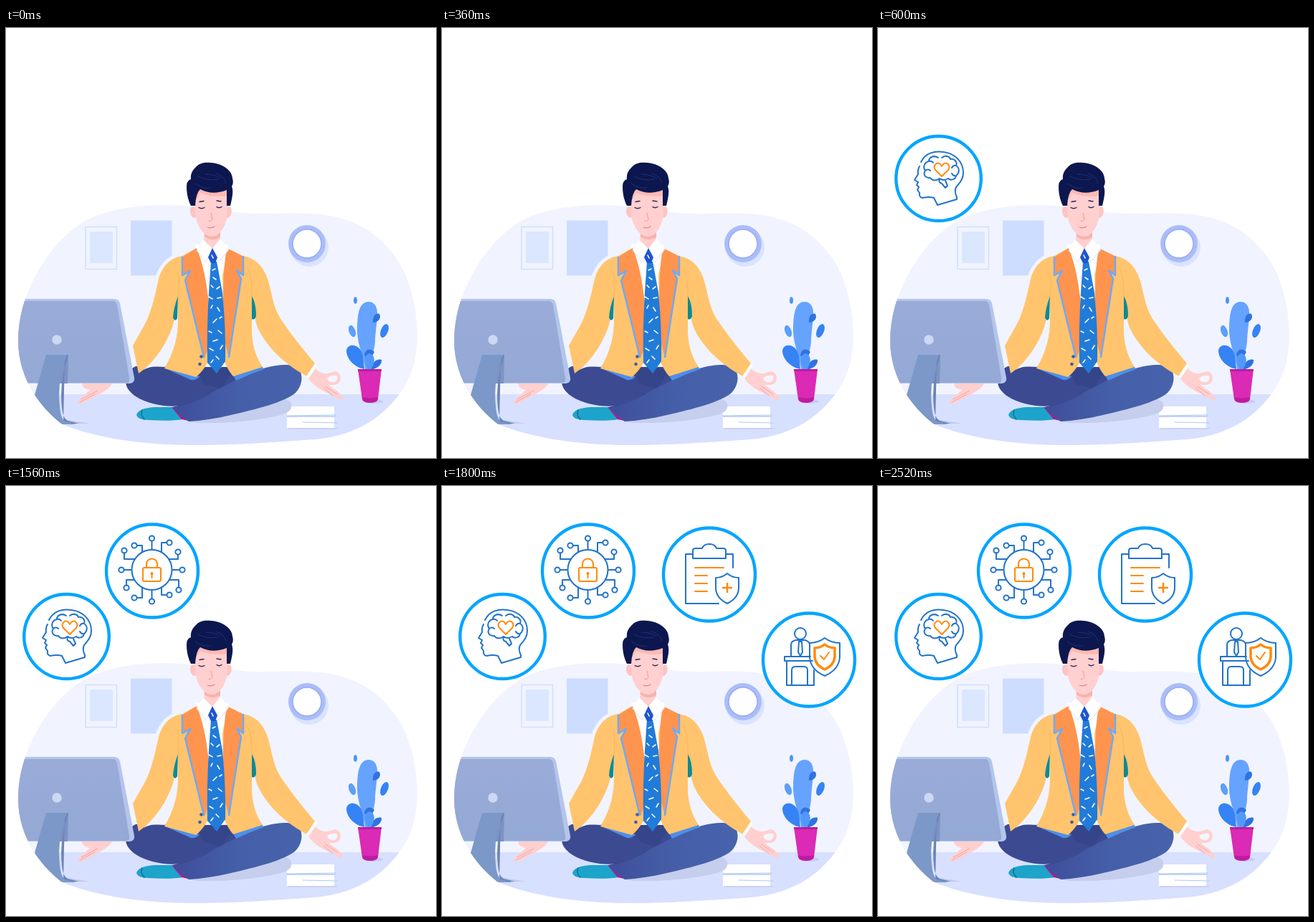
These frames come from a looping animation (600x600 px, 3000 ms). An HTML page:

```html
<!DOCTYPE html>
<html lang="en">
<head>
<meta charset="utf-8">
<title>Calm at work</title>
<style>
html, body { margin: 0; width: 100%; height: 100%; overflow: hidden; background: #fff; }
svg { display: block; width: 100vw; height: 100vh; }
.badge { opacity: 0; animation: 3s step-end infinite; }
.mind { animation-name: first; }
.lock { animation-name: second; }
.late { animation-name: third; }
@keyframes first { 0% { opacity: 0 } 20%, 100% { opacity: 1 } }
@keyframes second { 0% { opacity: 0 } 40%, 100% { opacity: 1 } }
@keyframes third { 0% { opacity: 0 } 60%, 100% { opacity: 1 } }
.badge { fill: none; stroke: #2273cb; stroke-width: 2; stroke-linejoin: round; stroke-linecap: round; }
.badge .ring { fill: #fff; stroke: #03a5ff; stroke-width: 4.4; }
.badge .hot { stroke: #ff8a0c; }
.line { fill: none; stroke-linecap: round; stroke-linejoin: round; }
</style>
</head>
<body>
<svg viewBox="0 0 600 600">
<defs>
  <clipPath id="blob"><path d="M17 437C17 412 22 392 28 375C46 327 79 283 121 264C148 252 187 247 219 247C269 247 307 258 347 259C385 260 416 256 452 262C494 269 524 291 546 323C565 353 574 393 574 432C573 463 566 489 548 512C522 546 486 569 430 574C372 578 320 582 265 582C195 582 125 573 77 552C41 524 17 482 17 437Z"/></clipPath>
  <linearGradient id="screen" x1="0" y1="0" x2="0" y2="1">
    <stop stop-color="#9aabd8"/><stop offset="1" stop-color="#94a9d5"/>
  </linearGradient>
  <linearGradient id="calf" x1="0" x2="1">
    <stop stop-color="#3f4e9b"/><stop offset=".5" stop-color="#455ea8"/><stop offset="1" stop-color="#4763ac"/>
  </linearGradient>
</defs>

<g clip-path="url(#blob)">
  <path fill="#f1f4ff" d="M0 230H600V600H0Z"/>
  <path fill="#d8e0ff" d="M0 511H600V600H0Z"/>
  <rect x="111" y="277.500" width="43.500" height="59" fill="none" stroke="#d0deff" stroke-width="1.500"/>
  <rect x="117" y="284" width="32" height="44" fill="#dbe6ff"/>
  <rect x="174" y="268.500" width="57.500" height="77" fill="#cdddff"/>
</g>
<circle cx="423" cy="306" r="27" fill="#dae3ff"/>
<circle cx="420" cy="301" r="26" fill="#aabdfa"/>
<circle cx="420" cy="301" r="20" fill="#fff" stroke="#98abee" stroke-width="1.500"/>

<!-- plant -->
<ellipse cx="513" cy="521" rx="13" ry="3" fill="#c5cdf1"/>
<path fill="#66a3ff" d="M501 477C500 460 491 445 490 424C490 398 493 382 506 382C515 382 519 390 518 402C517 417 515 428 515 438C514 452 508 462 508 477Z"/>
<g fill="#2f73df">
  <path d="M512 411C511 402 516 397 521 399C524 404 520 411 512 411Z"/>
  <path d="M509 477C511 466 517 461 524 463C525 470 518 475 509 477Z"/>
  <path d="M500 457C501 448 508 446 514 452L508 463Z"/>
</g>
<g fill="#3583f5">
  <path d="M500 476C485 473 475 461 475 450C476 442 486 440 493 447C499 454 499 466 500 476Z"/>
  <ellipse cx="528" cy="422.500" rx="5" ry="10" transform="rotate(22 528 422.500)"/>
</g>
<path fill="#5298fb" d="M507 478C499 468 499 456 507 454C515 455 517 468 507 478Z"/>
<ellipse cx="483" cy="423" rx="4.500" ry="8.500" fill="#5b9efc" transform="rotate(-20 483 423)"/>
<ellipse cx="487.500" cy="380" rx="2.500" ry="4.800" fill="#4e94f3"/>
<path fill="#db2ab5" d="M491 476H524L519 518Q518 523 508 523Q498 523 497 518Z"/>
<path fill="#bd1ba0" d="M491 476H524L523.500 479H491.500ZM497 515Q508 518 519 515L518 520Q508 526 498 520Z"/>

<!-- books -->
<path fill="#c9d2f3" d="M392 541H460V543H392ZM394 558H465L460 560H394Z"/>
<path fill="#fff" d="M392 528H458V541H392ZM392 543H458V558H392Z"/>
<path class="line" stroke="#a9cdf5" d="M392 541L460 540M414 550L462 551"/>

<!-- legs -->
<path fill="#c6ceee" d="M252 549L390 518Q400 520 398 530Q396 538 375 542Q330 552 270 551Z"/>
<path fill="#ffd0cf" d="M430 474C437 481 446 484 452 481L460 479Q466 481 467 488Q467 496 459 498L450 498L464 508L471 517L468 520L454 512C443 507 430 501 422 489Z"/>
<path fill="#f4f5ff" d="M448 489Q452 484 462 485Q464 490 459 494Q451 496 448 489Z"/>
<path class="line" stroke="#f3a6a5" d="M446 500L462 511M443 502L456 513"/>
<path fill="#ffd0cf" d="M150 493C143 507 130 510 117 518L103 525L99 522L107 514L117 505Q106 503 106 496Z"/>
<path class="line" stroke="#f3a6a5" d="M128 506L105 518M124 511L103 522"/>
<path fill="#3c4a92" d="M181 472C171 477 166 486 167 495C169 511 191 523 220 527C250 531 272 519 294 510L350 488L322 473H240Z"/>
<path fill="#35458a" d="M264 473H320L300 503L276 497Z"/>
<path fill="#1ca4cb" d="M182 540C184 533 193 530 207 529L234 529L247 546Q230 549 198 547Q184 547 182 540Z"/>
<path class="line" stroke="#126d9c" stroke-width="1.500" d="M190 533Q187 540 193 546"/>
<path fill="#a91d94" d="M231 529H241L254 548L245 546Z"/>
<path fill="url(#calf)" d="M232 529C271 521 301 500 340 482C363 471 397 465 408 475C415 483 414 499 404 509C389 522 349 532 314 540C293 545 272 548 255 549Q242 540 232 529Z"/>
<path class="line" stroke="#374690" d="M235 529C256 525 270 518 285 510"/>

<!-- jacket -->
<path class="line" stroke="#f1f4ff" stroke-width="11" d="M246 318C227 323 219 333 213 350L206 380"/>
<path fill="#f1f4ff" d="M233 400L245 400L239 440L221 473Q205 470 192 477Q219 450 233 400Z"/>
<path fill="#4e8fe8" d="M222 475L270 486Q266 492 258 491ZM357 472L316 483L321 492Q340 483 360 476Z"/>
<path fill="#fff" d="M264 302H310L316 400L306 470L296 476L280 465Z"/>
<path fill="#ffc46d" d="M264 308L246 318C228 321 218 333 213 350C208 372 204 393 194 413L177 443L185 482C205 468 220 447 230 423C236 409 237 392 240 374V407C240 431 235 451 221 475L265 487Q274 480 282 466L278 350Z"/>
<path fill="#ffc46d" d="M310 308L330 318C349 321 359 333 365 350C371 369 372 387 382 404C395 424 411 444 431 468L420 486C386 468 363 443 352 420C347 409 345 390 343 374V425C344 446 350 461 358 473L317 486Q310 478 305 466L302 345Z"/>
<path fill="#0f8992" d="M240 374Q234 390 233 404Q236 411 239 405ZM343 374Q349 384 349 402Q347 408 343 406Z"/>
<path fill="#fff" d="M431 468L434 471L423 488L419 486Z"/>
<path class="line" stroke="#f5b454" stroke-width=".8" d="M239 340Q243 355 240 374M337 335Q344 350 343 374"/>
<path fill="#ff944f" d="M266 307L247 319L246 346L257 340L250 351L277 460L283 445L283 385Q278 335 266 307Z"/>
<path fill="#ff944f" d="M308 307L330 318L331 345L321 338L328 350L311 460L306 440L303 385Q303 335 308 307Z"/>
<path class="line" stroke="#6fa9f6" stroke-width="2.500" d="M246 320L246 345L257 339L250 352L276 459M331 319L331 345L322 338L328 350L311 459"/>
<circle cx="272.500" cy="458.500" r="2.300" fill="#3c5da8"/>
<circle cx="270.500" cy="469" r="2.300" fill="#3c5da8"/>

<!-- neck, shirt and tie -->
<path fill="#ffd0cf" d="M277 279H299V300L288 309L276 299Z"/>
<path fill="#f8b2ae" d="M277 285Q288 296 299 285V292Q288 299 277 291Z"/>
<path fill="#fff" d="M275 295L288 308L279 328L266 310ZM299 294L288 308L298 328L311 309Z"/>
<path class="line" stroke="#dbe4f8" d="M266 310L279 327L287 309L297 327L310 309"/>
<path fill="#217bd9" d="M286 326H294L302 369Q307 420 306 465L294 482L281 467Q280 420 283 369Z"/>
<path fill="#1e55cf" d="M288 307L295 320L292 328H286L282 320Z"/>
<path class="line" stroke="#fff" stroke-width="1.600" d="M288 338L292 336M289 348L293 351M286 359L289 362M294 364L298 361M283 375L288 378M295 377L300 376M286 391L288 387M295 390L298 395M289 411L294 406M298 405L301 403M283 423L287 425M296 422L301 426M289 437L295 435M284 447L289 450M299 448L302 443M293 458L297 462M286 467L289 463M287 317L289 321"/>

<!-- head -->
<ellipse cx="262" cy="257" rx="5" ry="8" fill="#ffc3c2" transform="rotate(-12 262 257)"/>
<ellipse cx="310" cy="257" rx="4.500" ry="8" fill="#ffc3c2" transform="rotate(12 310 257)"/>
<path fill="#ffd0cf" d="M263 225H309V258C308 276 298 291 287 291C276 291 265 276 264 258Z"/>
<path fill="#ffb9b3" d="M266 224H308V234Q288 237 271 230Q267 236 264 243Z"/>
<path fill="#0c174f" d="M258 211C257 202 262 197 265 194C270 188 278 187 286 188C302 189 316 199 316 210Q318 216 315 221C318 229 315 239 313 248H308V226Q288 234 271 225Q265 230 264 248H258C253 238 252 229 252 221Q252 213 258 211Z"/>
<path class="line" stroke="#27347b" stroke-width=".8" d="M268 207Q281 214 296 211M278 204Q291 204 300 210M293 203Q305 207 307 216M264 217Q275 225 286 223"/>
<path class="line" stroke="#28275a" stroke-width="1.300" d="M269 250.500Q273 253 277 250.500M294 249.500Q297 252 301 249.500M270 242.500L276 241.500M294 241L300 242"/>
<path class="line" stroke="#f3a3a3" stroke-width="1.200" d="M286 258L288 267Q285 271 283 269"/>
<path class="line" stroke="#e68588" stroke-width="1.200" d="M281 278Q286 280 291 277"/>

<!-- monitor -->
<g clip-path="url(#blob)">
  <path fill="#c1caeb" d="M70 552L87 547L117 552Z"/>
  <path fill="#b4c5ec" d="M0 378H151Q157 378 159 384L179 488Q180 495 173 496H0Z"/>
  <path fill="url(#screen)" d="M0 381H149Q153 381 155 386L172 488Q173 495 168 495H0Z"/>
  <path fill="#7d93c4" d="M70 456H87L86 496H70Z"/>
  <path fill="#6b85b7" d="M82 458L87 456Q74 495 78 530Q79 544 86 548L102 552H80Z"/>
  <path fill="#7b98c8" d="M56 456H85Q71 492 75 528Q76 544 82 549L98 553H32V540Z"/>
  <circle cx="71" cy="435" r="6.700" fill="#cdd8f3"/>
</g>

<g class="badge mind">
  <ellipse class="ring" cx="84.500" cy="210" rx="59.300" ry="59"/>
  <path d="M60 187C66 174 80 171 91 173C108 175 119 187 119 202C119 211 114 216 109 222Q106 228 110 236L110 239L83 247L78 237Q71 235 62 237Q57 236 58 230L55 226L57 222L54 219L56 215L51 212L56 204Q55 198 58 193"/>
  <path d="M84 181C78 177 71 180 71 186C65 187 62 194 66 199C62 205 67 210 73 209C76 214 82 213 86 210Q84 216 89 217L94 223L97 220L94 213M89 181C94 177 100 179 101 183C107 182 111 187 109 192C115 196 113 203 109 206C108 212 101 213 98 210Q91 214 86 210M71 186Q75 185 77 188M66 199Q70 196 73 199M109 192Q105 191 103 195M109 206Q105 207 103 203"/>
  <path class="hot" d="M89 207L80 198C76 192 82 186 87 190L89 193L91 190C96 186 102 192 98 198Z"/>
</g>

<g class="badge lock">
  <ellipse class="ring" cx="204" cy="118.500" rx="64" ry="65"/>
  <circle cx="203.500" cy="117" r="28"/>
  <path d="M203.500 77V89M203.500 145V157M165 117H175M232 117H242M165 93V102H180M183 83H190V92M224 79H217V92M240 96V102H227M168 138V131H179M183 156H190V142M224 152H217V142M241 141V131H228"/>
  <g id="nodes"></g>
  <g class="hot">
    <rect x="191" y="114" width="25" height="19" rx="2"/>
    <path d="M196 114V109C196 99 211 99 211 109V114M203.500 123V128"/>
    <circle cx="203.500" cy="122" r="1"/>
  </g>
</g>

<g class="badge late">
  <ellipse class="ring" cx="373" cy="123.500" rx="64" ry="65"/>
  <path d="M350 95H340V164H386M396 95H406V114M350 101V90Q350 87 354 87H363Q365 81 373 81Q381 81 383 87H392Q396 87 396 90V101Z"/>
  <path class="hot" d="M353 114H393M353 125H370M353 136H370M353 147H370"/>
  <path d="M398 122Q405 128 414 128V142Q414 156 398 164Q382 156 382 142V128Q391 128 398 122Z"/>
  <path class="hot" stroke-width="2.500" d="M398 136V148M392 142H404"/>
</g>

<g class="badge late">
  <ellipse class="ring" cx="512" cy="242.500" rx="64" ry="65"/>
  <circle cx="500" cy="206" r="8"/>
  <path d="M487 237V222Q487 216 494 215H506Q511 216 513 220M498 217L497 232L500 237L503 232L502 217Z"/>
  <path d="M514 238H478V244H517M481 244V278H519V257M488 278V257Q488 252 493 252H505Q510 252 510 257V278"/>
  <path d="M534 212Q543 219 555 219V239Q554 256 534 265Q514 256 513 239V219Q525 219 534 212Z"/>
  <path class="hot" style="stroke-width: 3.500" d="M534 221Q540 226 548 226V239Q547 250 534 256Q521 250 520 239V226Q528 226 534 221Z"/>
  <path class="hot" d="M528 237L533 242L540 232"/>
</g>
</svg>
<script>
const spots = [[203.5, 73], [203.5, 161], [161, 117], [246, 117], [165, 90], [179, 83],
  [228, 79], [240, 92], [168, 142], [179, 156], [228, 152], [241, 145]];
document.getElementById("nodes").innerHTML =
  spots.map(([x, y]) => `<circle cx="${x}" cy="${y}" r="3.6"/>`).join("");
</script>
</body>
</html>
```
